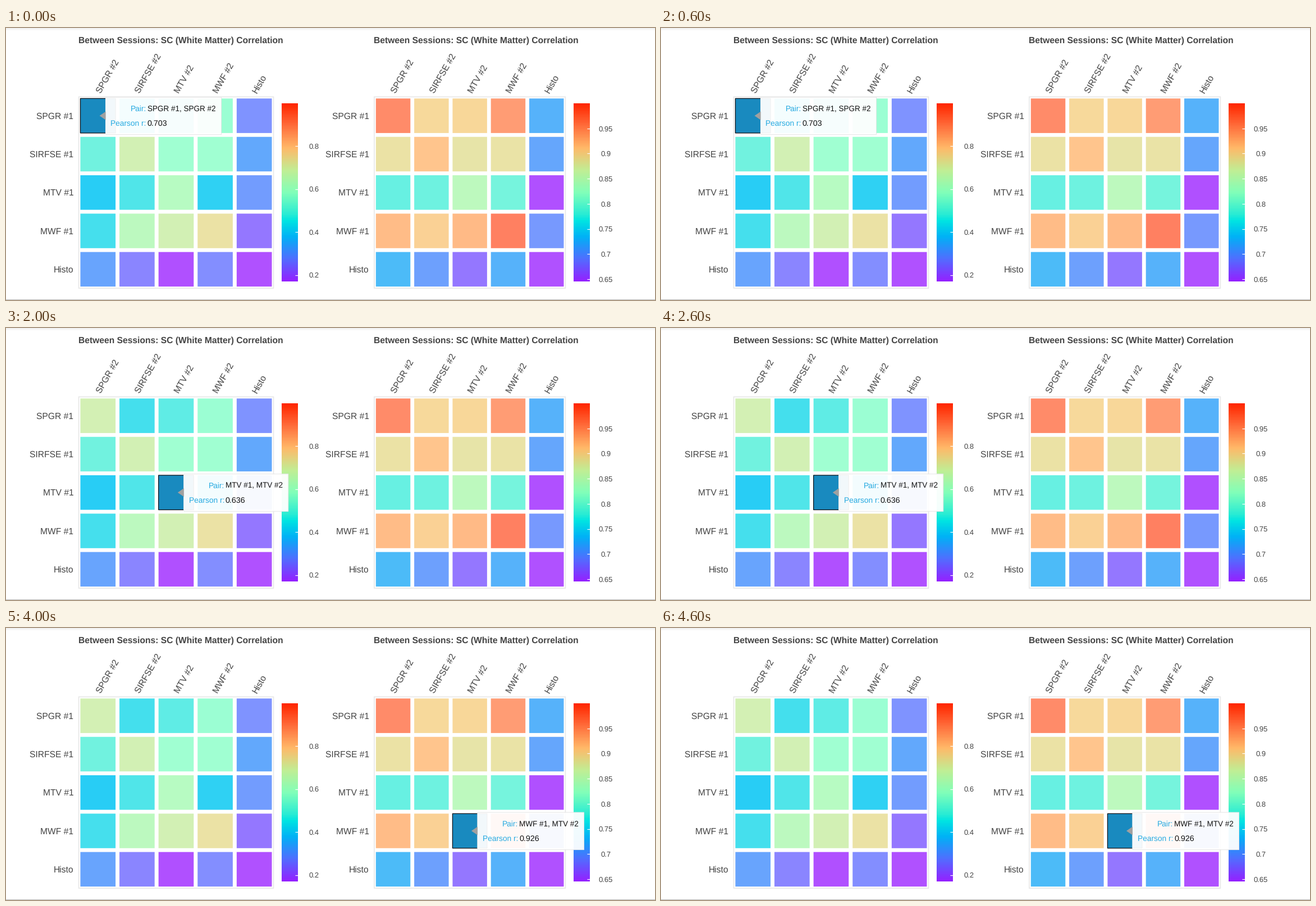
Write a matplotlib script that moves like this. It is 1156 px wide and 484 px high and loops after 5000 ms.

```python
import numpy as np
import matplotlib.pyplot as plt
from matplotlib.animation import FuncAnimation
from matplotlib.colors import LinearSegmentedColormap
from matplotlib.patches import Polygon, Rectangle

W, H, DPI = 1156, 484, 100
plt.rcParams.update({
    "font.family": "Liberation Sans",
    "text.hinting": "none",
    "toolbar": "None",
})

INK = "#444444"
TOP, ROW_H = 122.0, 68.3
BAR_TOP, BAR_BOTTOM = 134, 451
NAMES = ["SPGR", "SIRFSE", "MTV", "MWF", "Histo"]

BAR_MAP = LinearSegmentedColormap.from_list("bar", [
    (0, "#9421ff"), (.125, "#506eff"), (.25, "#00b2f6"), (.34, "#00e4e2"),
    (.375, "#28ecd5"), (.5, "#82ffb9"), (.625, "#c1ee94"), (.75, "#ffb969"),
    (.875, "#ff6e3c"), (1, "#ff2600")])
CELL_MAP = LinearSegmentedColormap.from_list("cell", [
    (0, "#b050ff"), (.06, "#9477ff"), (.12, "#7f93ff"), (.175, "#62a8fc"),
    (.22, "#4cbbf8"), (.28, "#28cdf5"), (.32, "#44dfed"), (.37, "#62eee4"),
    (.41, "#76f4dd"), (.5, "#a0ffd2"), (.57, "#bafac0"), (.643, "#d3f0b4"),
    (.7, "#ebe2a5"), (.735, "#f7d99b"), (.775, "#ffc58d"), (.84, "#ff9c74"),
    (.89, "#ff8061"), (1, "#ff5041")], N=1024)

# Cell values as a fraction of each colour scale
LEFT = [
    [.643, .32, .365, .49, .12],
    [.40, .64, .50, .50, .175],
    [.28, .34, .562, .29, .145],
    [.322, .575, .64, .70, .06],
    [.165, .09, 0, .11, 1],
]
RIGHT = [
    [.87, .735, .74, .84, .20],
    [.70, .775, .69, .697, .17],
    [.38, .395, .58, .41, 0],
    [.79, .75, .792, .89, .135],
    [.22, .155, .06, .20, 1],
]

fig = plt.figure(figsize=(W / DPI, H / DPI), dpi=DPI, facecolor="white")
ax = fig.add_axes([0, 0, 1, 1])
ax.axis("off")


def label(x, y, text, px, **kw):
    kw.setdefault("color", INK)
    kw.setdefault("va", "baseline")
    return ax.text(x, y, text, fontsize=px * 72 / DPI, **kw)


def box(x, y, w, h, **kw):
    return ax.add_patch(Rectangle((x, y), w, h, snap=False, **kw))


def px(n):
    return n * 72 / DPI


class Heatmap:
    def __init__(self, x, col_w, values, bar_x, low, high, ticks):
        self.x, self.col_w = x, col_w
        label(x, 27, "Between Sessions: SC (White Matter) Correlation", 15.6,
              weight="bold")
        box(x + .5, TOP + .5, col_w * 5 - 1, ROW_H * 5 - 1, fill=False,
            ec="#e7e7e7", lw=px(1.6))
        for i, name in enumerate(NAMES):
            cx, cy = self.center(i, i)
            tag = "" if name == "Histo" else " #"
            label(x - 8.7, cy + 5.5, name + (tag and tag + "1"), 15.6,
                  ha="right")
            label(cx + 4.6, 117, name + (tag and tag + "2"), 15.6,
                  rotation=60, rotation_mode="anchor")
            for col in range(5):
                box(*self.cell(i, col), fc=CELL_MAP(values[i][col]), lw=0)
        self.draw_bar(bar_x, low, high, ticks)

    def center(self, row, col):
        return self.x + (col + .5) * self.col_w, TOP + (row + .5) * ROW_H

    def cell(self, row, col):
        cx, cy = self.center(row, col)
        w, h = self.col_w * .9, ROW_H * .9
        return cx - w / 2, cy - h / 2, w, h

    def draw_bar(self, x, low, high, ticks):
        ramp = np.linspace(0, 1, 317)[:, None]
        ax.imshow(ramp, cmap=BAR_MAP, aspect="auto", origin="lower",
                  extent=(x, x + 29, BAR_BOTTOM, BAR_TOP), zorder=1)
        for t in ticks:
            f = (t - low) / (high - low)
            y = BAR_BOTTOM + (BAR_TOP - BAR_BOTTOM) * f
            ax.plot([x + 23.5, x + 29], [y, y], color="white", lw=px(1.2),
                    solid_capstyle="butt")
            label(x + 57.6, y + 4.7, f"{t:g}", 13, ha="center")


def page_edges():
    shade = np.linspace(.945, 1, 6)[:, None]
    ax.imshow(shade, cmap="gray", vmin=0, vmax=1, aspect="auto",
              extent=(0, W, 6, 0), zorder=0)
    ax.plot([0, W], [482.5, 482.5], color="#bdbdbd", lw=px(1.2))


page_edges()
left = Heatmap(129, 69.6, LEFT, 491, .17, .9987, [.2, .4, .6, .8])
right = Heatmap(655.4, 68.3, RIGHT, 1011, .6455, 1,
                [.65, .7, .75, .8, .85, .9, .95])
ax.set_xlim(0, W)
ax.set_ylim(H, 0)

# panel, row, column, coefficient, tooltip width
HOVERS = [
    (left, 0, 0, "0.703", 206),
    (left, 1, 1, "0.688", 223.5),
    (left, 2, 2, "0.636", 186),
    (right, 1, 1, "0.920", 223.5),
    (right, 3, 2, "0.926", 189.5),
]

picked = box(0, 0, 1, 1, fc="#198abf", ec="#10151c", lw=px(1.3), zorder=5)
tip = box(0, 0, 1, 1, fc=(1, 1, 1, .95), ec="#e5e5e5", lw=px(1), zorder=6)
cover = box(0, 0, 1, 1, fc="#f3f7f9", lw=0, zorder=6.5)
arrow = ax.add_patch(Polygon([(0, 0), (1, 1), (1, 0)], fc="#a0a0a0", lw=0,
                             zorder=7))
keys = [label(0, 0, t, 13.7, color="#26aae1", ha="right", zorder=8)
        for t in ("Pair:", "Pearson r:")]
pair = label(0, 0, "", 13.55, color="#111111", zorder=8)
coef = label(0, 0, "", 14.2, color="#111111", zorder=8)


def update(i):
    panel, row, col, value, width = HOVERS[i]
    cx, cy = panel.center(row, col)
    picked.set_bounds(*panel.cell(row, col))
    x = cx + 13.8
    tip.set_bounds(x, cy - 33, width, 66.5)
    cover.set_bounds(x - .3, cy - 32.5, 1, 65.5)
    arrow.set_xy([(x - 11, cy), (x, cy - 7.5), (x, cy + 7.5)])
    for key, text, dy in zip(keys, (pair, coef), (-8.2, 17.8)):
        key.set_position((x + 72.3, cy + dy))
        text.set_position((x + 74, cy + dy))
    pair.set_text(f"{NAMES[row]} #1, {NAMES[col]} #2")
    coef.set_text(value)
    return [picked, tip, cover, arrow, *keys, pair, coef]


anim = FuncAnimation(fig, update, frames=len(HOVERS), interval=1000,
                     init_func=lambda: update(0), repeat=True,
                     repeat_delay=0, blit=False)
plt.show()
```
